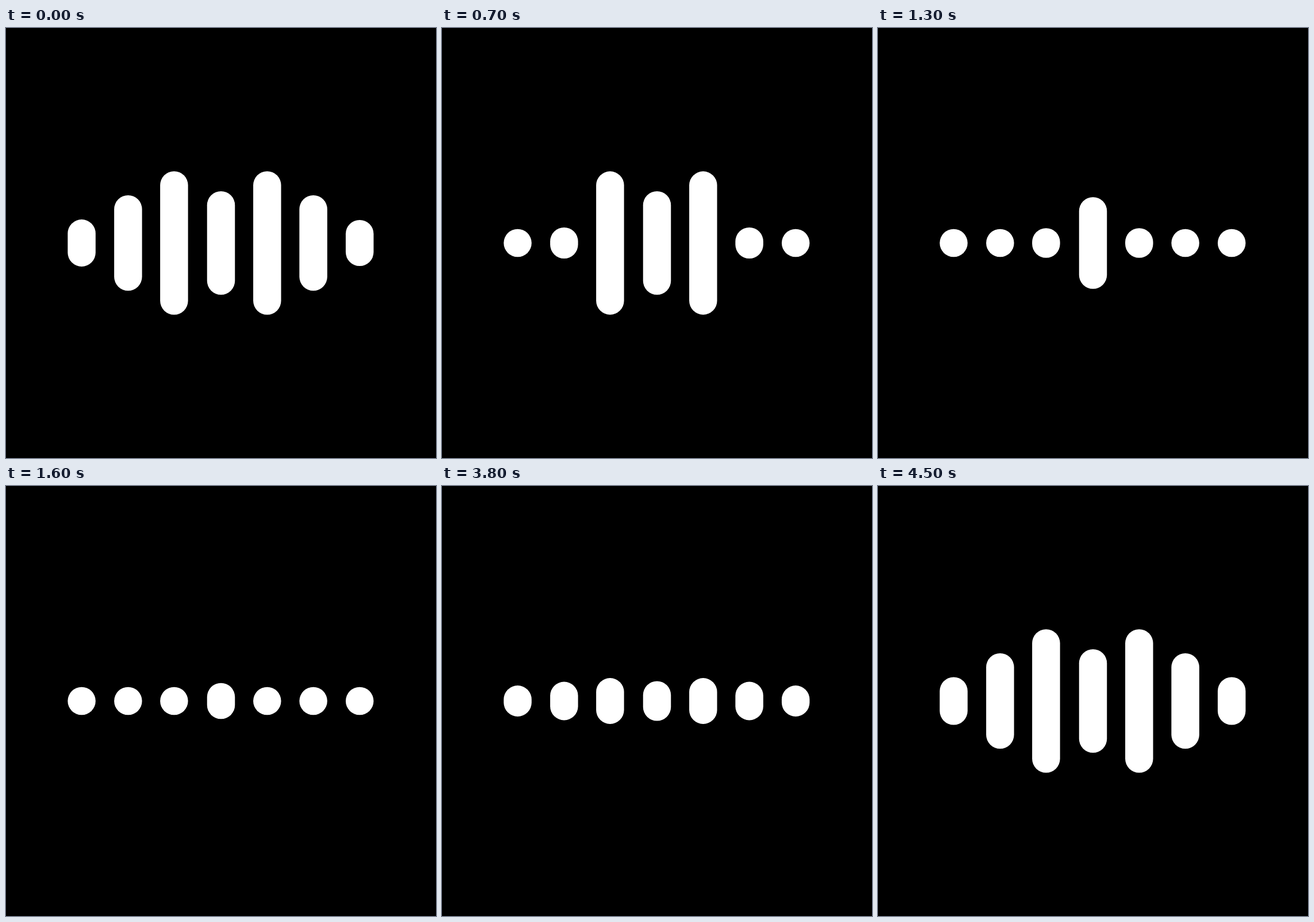
An HTML page with a canvas that plays this animation: 748x748 px, repeating every 7400 ms.

```html
<!DOCTYPE html>
<html lang="en">
<head>
<meta charset="utf-8">
<title>Sound bars</title>
<style>
  html, body { margin: 0; width: 100%; height: 100%; overflow: hidden; background: #000; }
  canvas { display: block; width: 748px; height: 748px; }
</style>
</head>
<body>
<canvas id="stage" width="748" height="748"></canvas>
<script>
const ctx = document.getElementById('stage').getContext('2d');
const LOOP = 7400, STEP = 100, MOVE = 760, GROW_AT = 3692;
const MID = 374, DOT = 48.5;

// Centre x, full height and the time each bar starts to shrink
const bars = [
  { x: 131.6, full: 83, shrinkAt: -62 },
  { x: 212.4, full: 166, shrinkAt: 192 },
  { x: 292.4, full: 249.5, shrinkAt: 692 },
  { x: 374, full: 180, shrinkAt: 1192 },
  { x: 454.3, full: 249.5, shrinkAt: 692 },
  { x: 534.6, full: 166, shrinkAt: 192 },
  { x: 615.2, full: 83, shrinkAt: -85 }
];

// cubic-bezier(0.3, 0, 0, 1), solved by bisection
function ease(u) {
  if (u <= 0) return 0;
  if (u >= 1) return 1;
  let lo = 0, hi = 1;
  for (let i = 0; i < 24; i++) {
    const p = (lo + hi) / 2;
    const x = 0.9 * (1 - p) ** 2 * p + p ** 3;
    if (x < u) lo = p; else hi = p;
  }
  return lo * lo * (3 - 2 * lo);
}

const progress = (time, start) => ease((time - start) / MOVE);

function drawBar({ x, full, shrinkAt }, time) {
  const size = 1 - progress(time, shrinkAt) + progress(time, GROW_AT);
  const height = DOT + (full - DOT) * size;
  ctx.beginPath();
  ctx.roundRect(x - DOT / 2, MID - height / 2, DOT, height, DOT / 2);
  ctx.fill();
}

function draw(now) {
  const time = Math.floor((now % LOOP) / STEP) * STEP;
  ctx.fillStyle = '#000';
  ctx.fillRect(0, 0, 748, 748);
  ctx.fillStyle = '#fff';
  bars.forEach(bar => drawBar(bar, time));
}

const begin = performance.now();
function tick() {
  draw(performance.now() - begin);
  requestAnimationFrame(tick);
}
tick();
</script>
</body>
</html>
```
